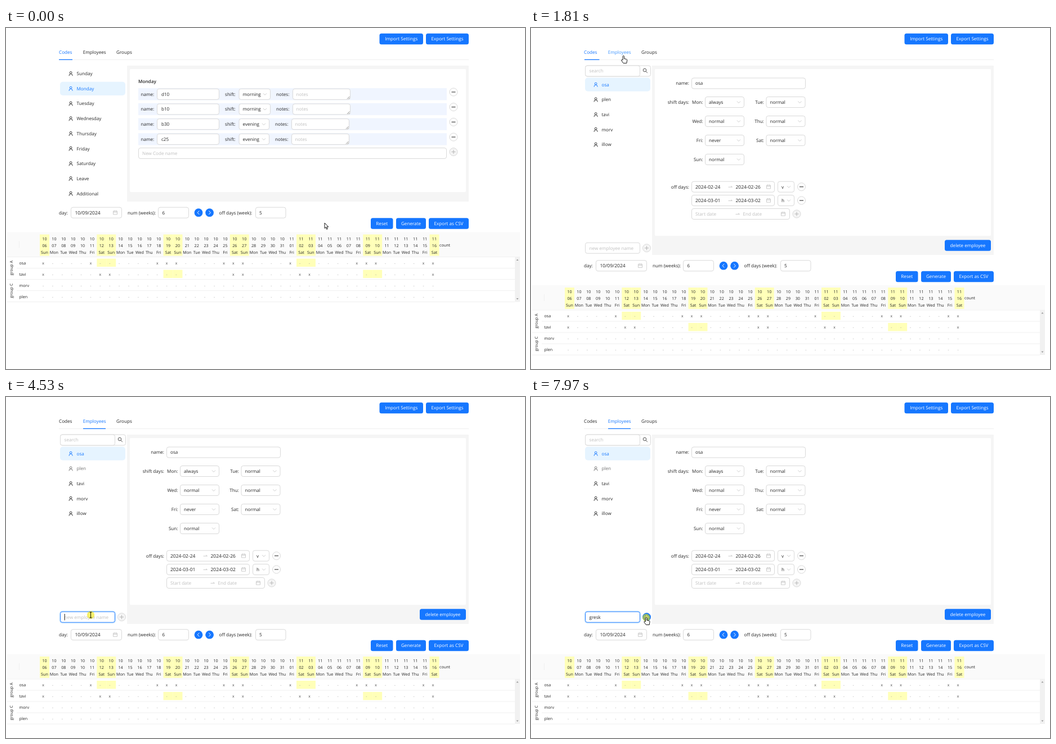
Animation, 922 px wide and 607 px high, one loop 8000 ms. Source, as an HTML page:

```html
<!DOCTYPE html>
<html lang="en">
<head>
<meta charset="utf-8">
<title>Shift planner</title>
<style>
html, body { margin: 0; width: 100%; height: 100%; overflow: hidden; background: #fff; }
svg { display: block; }
text { font: 8.15px "Open Sans", "Noto Sans", sans-serif; fill: #262626; text-rendering: geometricPrecision; white-space: pre; }
text.hint { fill: #bfbfbf; }
text.lit { fill: #1677ff; }
text.white { fill: #fff; }
text.bold { font-weight: 600; }
text.date { font-size: 8.5px; }
text.small { font-size: 7.2px; }
text.cell { font-size: 6.8px; fill: #444; }
text.dash { font-size: 6.8px; fill: #999; }
text.mid { text-anchor: middle; }
text.end { text-anchor: end; }
</style>
</head>
<body>
<svg id="stage" width="922" height="607" viewBox="0 0 922 607"></svg>
<script>
const BLUE = '#1677ff', EDGE = '#d9d9d9', YELLOW = '#ffffb8';
const STAFF = ['osa', 'plen', 'tavi', 'morv', 'illow'], ADDED = 'gresk';

// Drawing helpers; text is placed by its vertical centre.
const text = (x, y, s, cls = '', attr = '') => `<text x="${x}" y="${y + 2.8}" class="${cls}" ${attr}>${s}</text>`;
const rect = (x, y, x2, y2, fill, r = 0, attr = '') =>
  `<rect x="${x}" y="${y}" width="${x2 - x}" height="${y2 - y}" rx="${r}" fill="${fill}" ${attr}/>`;
const line = (d, stroke = '#f0f0f0', w = 1, attr = '') => `<path d="${d}" fill="none" stroke="${stroke}" stroke-width="${w}" ${attr}/>`;
const circle = (x, y, r, fill, stroke = 'none') => `<circle cx="${x}" cy="${y}" r="${r}" fill="${fill}" stroke="${stroke}"/>`;
const field = (x, x2, y, attr = '') => rect(x + .5, y - 9.5, x2 - .5, y + 9.5, '#fff', 3.5, `stroke="${EDGE}" ${attr}`);
const button = (x, x2, y, s) => rect(x, y - 9.7, x2, y + 9.7, BLUE, 3.5) + text((x + x2) / 2, y, s, 'white mid');
const select = (x, x2, y, s) => field(x, x2, y) + text(x + 7, y, s) + line(`M${x2 - 13} ${y - 1.5}l3 3 3-3`, '#bfbfbf', .8);
const calendar = (x, y) => line(`M${x - 3.5} ${y - 2.8}h7v6h-7zm0 2h7m-5-3.2v2m3-2v2`, '#bfbfbf', .8);
const arrow = (x, y) => line(`M${x - 3.5} ${y + .5}h7l-2.5-2`, '#bfbfbf', .8);
const minus = (x, y) => circle(x, y, 7, '#fff', EDGE) + line(`M${x - 3.5} ${y}h7`, '#333', 1.1);
const plus = (x, y, fill = '#f5f5f5', edge = EDGE, ink = '#b5b5b5') =>
  circle(x, y, 7, fill, edge) + line(`M${x - 3.5} ${y}h7m-3.5-3.5v7`, ink);
const user = (y, color) => line(`M112 ${y + 4}a3.1 3.6 0 0 1 6.2 0M113.2 ${y - 1.7}a1.9 1.9 0 1 1 3.8 0a1.9 1.9 0 1 1-3.8 0`, color, .9);

const menu = (items, top, chosen) => items.map((s, i) => {
  const y = top + i * 26.7, on = i == chosen;
  return `<g id="${s}">` + rect(96, y - 12.2, 212, y + 12, on ? '#e6f4ff' : 'transparent', 5) +
    user(y, on ? BLUE : '#262626') + text(125.5, y, s, on ? 'lit' : '') + '</g>';
}).join('');

function codesPage() {
  const days = ['Sunday', 'Monday', 'Tuesday', 'Wednesday', 'Thursday', 'Friday', 'Saturday', 'Leave', 'Additional'];
  let out = menu(days, 81.2, 1) + rect(215, 67, 822, 309, '#f5f5f5') + rect(220, 73, 817, 292, '#fff', 2) +
    text(235, 95.5, 'Monday', 'bold');
  [['d10', 'morning'], ['b10', 'morning'], ['b30', 'evening'], ['c25', 'evening']].forEach(([name, shift], i) => {
    const y = 117.8 + i * 26.7, d = i < 2 ? 0 : -2;
    out += rect(235, y - 10.7, 783, y + 10.7, '#f0f5ff') + text(239.5, y, 'name:') + field(268, 379, y) + text(276, y, name) +
      text(389, y, 'shift:') + select(413.5, 470 + d, y, shift) + text(480 + d, y, 'notes:') +
      field(509 + d, 612 + d, y) + text(515.5 + d, y, 'notes', 'hint') +
      line(`M${606 + d} ${y + 8.5}l4.5-4.5m-2 4.5l2-2`, '#777', .8) + minus(795, y - 3.8);
  });
  return out + field(235, 783, 223) + text(242, 223, 'New Code name', 'hint') + plus(795, 220.5);
}

function staffPage() {
  let out = line('M215.5 67V221') + field(96, 213, 76.5) + field(96, 194, 76.5, 'id="search"') + text(103.5, 76.5, 'search', 'hint') +
    line('M199.2 75a2.8 2.8 0 1 1 5.6 0a2.8 2.8 0 1 1-5.6 0m4.7 2.1l3 3', '#444', .9) + menu(STAFF, 100.8, 0) +
    rect(215, 67, 822, 404, '#f5f5f5') + rect(220, 73, 817, 370, '#fff', 2) +
    text(281, 98.5, 'name:', 'end') + field(285, 488, 98.5) + text(292, 98.5, STAFF[0]) +
    text(281, 132, 'shift days:', 'end') + text(281, 282.7, 'off days:', 'end');
  ['Mon always', 'Tue normal', 'Wed normal', 'Thu normal', 'Fri never', 'Sat normal', 'Sun normal'].forEach((s, i) => {
    const [day, mode] = s.split(' '), x = i % 2 * 108.5, y = 132 + (i >> 1) * 34;
    out += text(305.5 + x, y, day + ':', 'end') + select(309 + x, 379 + x, y, mode);
  });
  [['2024-02-24', '2024-02-26', 'v'], ['2024-03-01', '2024-03-02', 'h']].forEach(([from, to, kind], i) => {
    const y = 282.7 + i * 24.3;
    out += field(285, 433, y) + text(292, y, from, 'date') + arrow(354, y) + text(363.5, y, to, 'date') + calendar(422, y) +
      select(438, 468, y, kind) + minus(480.5, y);
  });
  return out + field(285, 460, 331) + text(292, 331, 'Start date', 'hint') + arrow(367, 331) + text(376.5, 331, 'End date', 'hint') +
    calendar(448, 331) + plus(472, 331) + button(735, 817, 387, 'delete employee') +
    rect(95.5, 381, 194.5, 402.5, 'none', 4.5, 'id="halo" stroke="#0591ff" stroke-opacity=".15" stroke-width="1.5"') +
    field(96, 194, 391.7, 'id="entry"') + text(103.5, 391.7, 'new employee name', 'hint', 'id="prompt"') +
    text(103.5, 391.7, '', '', 'id="typed"') + rect(0, 386, .9, 397.5, '#000', 0, 'id="caret"') +
    plus(205.5, 391.7) + `<g id="ready">${plus(205.5, 391.7, BLUE, BLUE, '#fff')}</g>`;
}

function planner() {
  const pitch = 16.89, weekend = i => i % 7 == 0 || i % 7 == 6;
  let out = text(94, 329, 'day:') + field(115, 206, 328.7) + text(122.5, 328.7, '10/09/2024', 'date') + calendar(194, 328.7) +
    text(216, 329, 'num (weeks):') + field(270, 325, 328.7) + text(277.5, 328.7, '6') +
    circle(342, 328.7, 7.4, BLUE) + line('M343.3 325.5l-3.2 3.2 3.2 3.2', '#fff') +
    circle(361.6, 328.7, 7.4, BLUE) + line('M360.3 325.5l3.2 3.2-3.2 3.2', '#fff') +
    text(378.5, 329, 'off days (week):') + field(443, 497.5, 328.7) + text(450, 328.7, '5') +
    button(648, 687.5, 348, 'Reset') + button(693, 746, 348, 'Generate') + button(751, 822, 348, 'Export as CSV') +
    rect(2, 363.5, 913, 407, '#fafafa') + line('M23.5 379.5V391.5') + text(770, 385.8, 'count', 'small') +
    line('M2 407.5H904M19 427.5H904M2 447.5H904M19 467.5H904M2 487.5H904');
  const rows = [
    { off: [1, 4], x: i => i % 7 == 5 || i == 0 || [13, 14, 20, 21, 34, 35, 41].includes(i) },
    { off: [2, 5], x: i => [0, 6, 7, 20, 21, 27, 28, 41].includes(i) },
    { off: [], x: () => false }, { off: [], x: () => false }
  ];
  rows[0].off[1] = 4;
  for (let i = 0; i < 42; i++) {
    const x = 68.5 + i * pitch, day = new Date(2024, 9, 6 + i);
    if (weekend(i)) out += rect(x - 8.5, 367.5, x + 8.5, 405.5, YELLOW);
    [day.getMonth() + 1, String(day.getDate()).padStart(2, '0'), 'Sun Mon Tue Wed Thu Fri Sat'.split(' ')[i % 7]]
      .forEach((s, k) => out += text(x, 374.7 + k * 12, s, 'small mid'));
    rows.forEach((row, r) => {
      const y = 418 + r * 20, week = Math.floor((i + 1) / 7);
      if (weekend(i) && row.off.includes(week)) out += rect(x - 8.5, y - 7.5, x + 8.5, y + 7, YELLOW);
      out += row.x(i) ? text(x - 2.5, y, 'x', 'cell mid') : text(x - 2.5, y, '-', 'dash mid');
    });
  }
  [0, 2, 3, 1].forEach((n, r) => out += text(23.5, 418 + r * 20, STAFF[n], 'small'));
  ['A', 'C'].forEach((s, i) => out += text(0, 0, 'group ' + s, 'small mid', `transform="translate(9 ${427 + i * 40.5}) rotate(-90)"`));
  return out + rect(904, 407, 913, 487.5, '#f1f1f1') + '<path d="M906.5 414l2-2.5 2 2.5zM906.5 481l2 2.5 2-2.5z" fill="#999"/>';
}

const shapes = {
  arrow: 'M0 0V9.6L2.2 7.6L3.7 11.3L5.3 10.6L3.8 7H6.8Z',
  hand: 'M-1.4 7V.6a1.2 1.2 0 0 1 2.4 0V4.6l4 .9q1.3.4 1.2 1.8l-.8 5.4H-.4L-3.8 8q-.5-1.3.7-1.5z',
  beam: 'M-2-5H2M0-5V5M-2 5H2'
};

document.getElementById('stage').innerHTML =
  button(663.5, 741, 19.5, 'Import Settings') + button(746, 822, 19.5, 'Export Settings') +
  line('M94 56.5H822') + text(94, 43.5, 'Codes', '', 'id="tab1"') + text(136.7, 43.5, 'Employees', '', 'id="tab2"') + text(196, 43.5, 'Groups') +
  rect(94, 55.7, 118, 57, BLUE, 0, 'id="ink"') +
  `<g id="codes">${codesPage()}</g><g id="staff">${staffPage()}</g><g id="planner">${planner()}</g>` +
  '<circle id="click" r="6.7" fill="#f0e600" fill-opacity=".58"/>' +
  '<path id="cursor" stroke="#000" stroke-width=".9" stroke-linejoin="round"/>';

const $ = id => document.getElementById(id);
const show = (id, on) => $(id).style.display = on ? '' : 'none';
const set = (id, attrs) => { for (const k in attrs) $(id).setAttribute(k, attrs[k]); };
const clamp = v => Math.max(0, Math.min(1, v));
const ease = v => v * v * (3 - 2 * v);
const within = (t, a, b) => t >= a && t < b;

// Pointer moves: start time, number of 70 ms steps, end point.
const moves = [
  [70, 1, 548, 303], [470, 3, 418, 158], [880, 10, 164.5, 50], [2440, 5, 151, 75], [3010, 4, 149.5, 122.8],
  [3350, 5, 150, 479], [3700, 4, 150, 375], [4110, 3, 150.5, 388], [6670, 3, 153, 384], [6960, 11, 204.8, 392.8]
];
function pointer(t) {
  let x = 566, y = 347;
  for (const [start, steps, x2, y2] of moves) {
    if (t < start) break;
    const p = ease(clamp((Math.floor((t - start) / 70) + 1) / steps));
    x += (x2 - x) * p;
    y += (y2 - y) * p;
  }
  return [x, y];
}

function cursorKind(x, y, staff) {
  const over = (a, b, c, d) => x > a && x < c && y > b && y < d;
  if (over(137, 32, 177, 57)) return 'hand';
  if (!staff) return 'arrow';
  if (over(96, 67, 194, 86) || over(96, 382, 194, 402)) return 'beam';
  return over(96, 89, 212, 220) || over(198, 384, 213, 399) ? 'hand' : 'arrow';
}

const keys = [5400, 5540, 5740, 5940, 6140];
const carets = [[4460, 5000], [5400, 6670], [7200, 7730]];

function draw(t) {
  const staff = t >= 1810, [x, y] = pointer(t), kind = cursorKind(x, y, staff);
  show('codes', !staff);
  show('staff', staff);
  set('planner', { transform: `translate(0 ${staff ? 94.5 : 0})` });

  const slide = ease(clamp((t - 1780) / 340));
  set('ink', { x: 94 + 43 * slide, width: 24 + 16 * Math.sqrt(slide) });
  $('tab1').style.fill = t < 1950 ? BLUE : '#262626';
  $('tab2').style.fill = t >= 2000 ? BLUE : kind == 'hand' ? '#4096ff' : '#262626';

  set('search', { stroke: staff && kind == 'beam' && y < 90 ? '#4096ff' : EDGE });
  const second = $(STAFF[1]), left = t >= 3420;
  second.firstChild.setAttribute('fill', staff && !left && kind == 'hand' && y > 114 ? '#f5f5f5' : 'transparent');
  second.style.opacity = left ? .65 : 1;

  const focus = t >= 4460, typed = ADDED.slice(0, keys.filter(k => t >= k).length);
  set('entry', { stroke: focus ? BLUE : t >= 4110 && y > 381 ? '#4096ff' : EDGE });
  show('halo', focus);
  show('prompt', !typed);
  $('typed').textContent = typed;
  set('caret', { x: 103.7 + (typed && staff ? $('typed').getComputedTextLength() : 0) });
  show('caret', carets.some(([a, b]) => within(t, a, b)));
  $('ready').style.opacity = clamp((t - 5380) / 200);

  show('click', within(t, 1740, 1810) || within(t, 4390, 4670) || t >= 7830);
  set('click', { cx: x, cy: y });
  set('cursor', { d: shapes[kind], fill: kind == 'beam' ? 'none' : '#fff', transform: `translate(${x} ${y})` });
}

const began = performance.now();
function tick() {
  draw((performance.now() - began) % 8000);
  requestAnimationFrame(tick);
}
tick();
</script>
</body>
</html>
```
